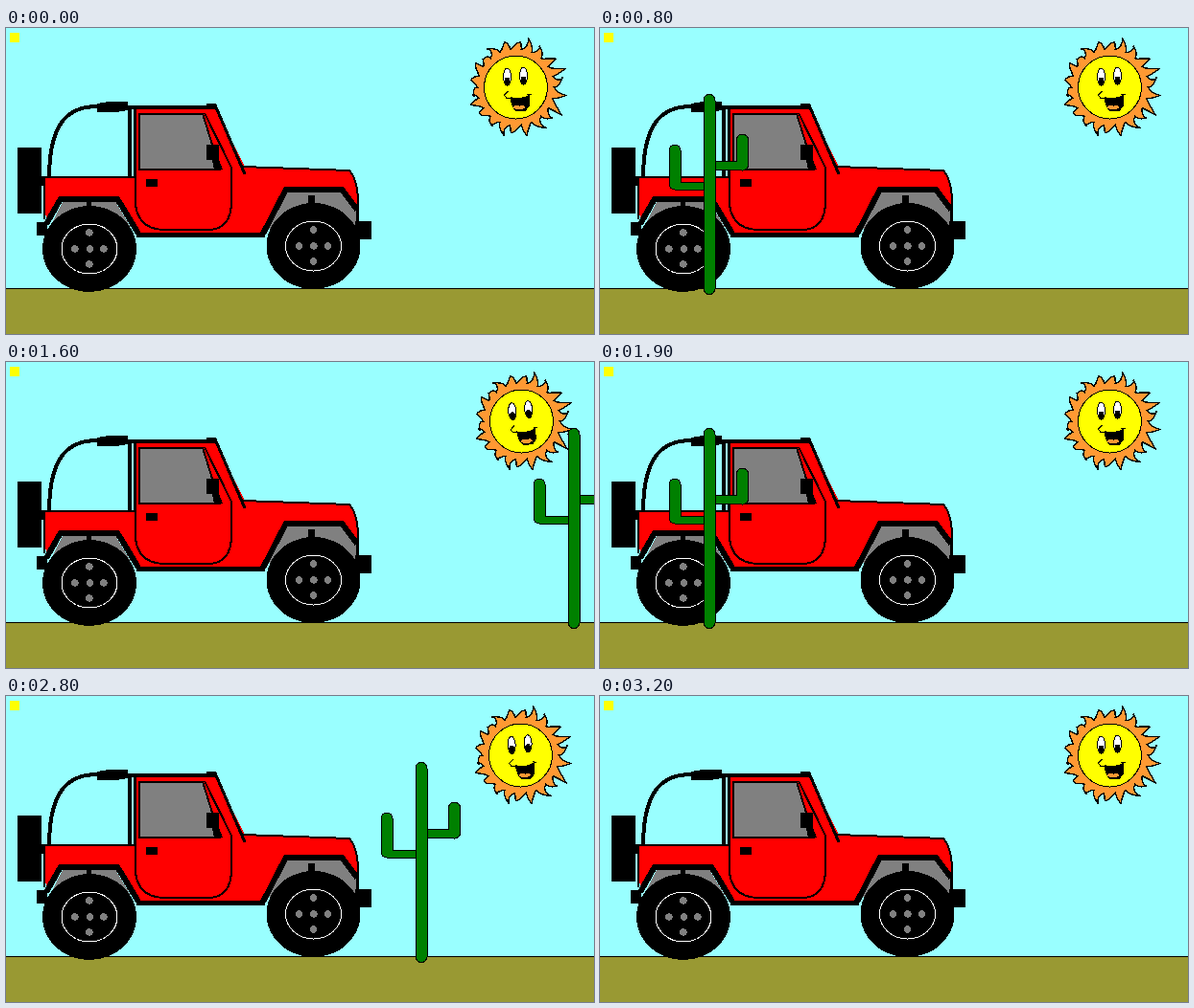
These frames come from a looping animation (613x320 px, 3300 ms). An HTML page:

```html
<!DOCTYPE html>
<html lang="en">
<head>
<meta charset="utf-8">
<title>Desert drive</title>
<style>
  html, body { margin: 0; width: 100%; height: 100%; overflow: hidden; background: #9ff; }
  svg { display: block; width: 613px; height: 320px; shape-rendering: crispEdges; }
  .line { fill: none; stroke: #000; }
  .grey { fill: #808080; }
</style>
</head>
<body>
<svg viewBox="0 0 613 320">
  <defs>
    <g id="wheel">
      <ellipse rx="49" ry="45"/>
      <ellipse rx="29" ry="26" fill="none" stroke="#fff"/>
      <g class="grey">
        <circle cy="-17" r="3.7"/><circle cx="-15" r="3.7"/><circle cx=".5" r="3.7"/>
        <circle cx="15" r="3.7"/><circle cy="16" r="3.7"/>
      </g>
    </g>
  </defs>

  <rect width="613" height="320" fill="#9ff"/>
  <rect y="272" width="613" height="48" fill="#993"/>
  <rect y="272" width="613" height="1"/>
  <rect x="4" y="5" width="10" height="10" fill="#ff0"/>

  <g id="sun">
    <path id="rays" fill="#f93" stroke="#000" stroke-width="1.4"/>
    <circle r="33" fill="#ff0" stroke="#000"/>
    <g id="face">
      <g fill="#fff" stroke="#000">
        <ellipse cx="-9" cy="-11" rx="4" ry="9"/>
        <ellipse cx="8" cy="-12" rx="4" ry="9"/>
      </g>
      <ellipse cx="-9" cy="-6" rx="3" ry="4.5"/>
      <ellipse cx="8" cy="-7" rx="3" ry="4.5"/>
      <path class="line" d="M-8 4L-12 8L-10 11H-6Q5 14 14 8M12 7L16 8"/>
      <path d="M-6 10Q5 13 14 8V20L10 25H0Q-5 21 -6 10Z"/>
      <path d="M-3 21Q0 17 4 20Q8 17 10 21Q4 26 -3 21Z" fill="#f93"/>
    </g>
  </g>

  <g id="car">
    <path class="line" stroke-width="4" d="M45 157C45 131 49 105 64 92C75 83 86 82 98 82"/>
    <path d="M95 79L107 77H127V86L115 88H95Z"/>
    <path fill="#f00" d="M39 156H134V83H218L249 145L358 149Q368 160 367 190L350 169H292L268 215H138L115 179H57L42 204Z"/>
    <path class="line" stroke-width="4" d="M126 83H218M128.500 83V157"/>
    <path class="line" stroke-width="3" d="M209 80.500H218L249 153"/>
    <path class="line" stroke-width="2" d="M40 200V156H134V83M247 145L358 149Q368 160 367 190"/>
    <path class="line" stroke-width="2" d="M134.500 84V178Q135 210 164 211H212Q235 210 235 181V146L207 89"/>
    <path class="grey" stroke="#000" stroke-width="2" d="M139 89.500H205L223 148H139Z"/>
    <path d="M209 122H222V138L226 148H217L215 138H209Z"/>
    <rect x="146" y="158" width="12" height="8"/>
    <path d="M12 125H37V155H41V165H37V194H12Z"/>

    <path class="grey" d="M46 208L60 180H113L130 208ZM272 210L294 171H350L365 190V208Z"/>
    <path class="line" stroke-width="6" d="M42 205L57 178.500H116L138 215M268 215L292 168.500H350L366 190"/>
    <path class="line" stroke-width="5" d="M136 216.500H270"/>
    <path class="line" stroke-width="3" d="M366 188V206"/>
    <rect x="84" y="181" width="5" height="9"/>
    <rect x="315" y="175" width="7" height="11"/>
    <rect x="32" y="203" width="11" height="14"/>
    <rect x="364" y="202" width="17" height="19"/>
    <use href="#wheel" x="87" y="231"/>
    <use href="#wheel" x="320.500" y="228"/>
  </g>

  <g id="puff" class="grey">
    <ellipse cx="5" cy="227" rx="4" ry="4"/>
    <ellipse cx="12" cy="230.500" rx="8" ry="4.500"/>
    <ellipse cx="19" cy="224.500" rx="4" ry="5"/>
  </g>
  <g id="cactus" fill="none" stroke-linecap="round"></g>
</svg>
<script>
const el = id => document.getElementById(id);
const STEP = 100, STEPS = 11;

// Narrow flames of uneven length, bent sideways, with short valleys between.
function rayPath(count) {
  const at = (r, a) => (r * Math.cos(a)).toFixed(1) + " " + (r * Math.sin(a)).toFixed(1);
  const gap = 2 * Math.PI / count;
  let d = "M" + at(40, 0);
  for (let i = 0; i < count; i++) {
    const a = i * gap;
    const tip = 50 + 3 * Math.sin(i * 2.3) + 3 * Math.cos(a);
    const lean = gap * (.55 + .35 * Math.sin(i * 1.7));
    d += `Q${at(41, a + gap * .15)} ${at(42, a + gap * .25)}`;
    d += `Q${at(47, a + gap * .55)} ${at(tip, a + lean)}`;
    d += `Q${at(46, a + gap * .95)} ${at(40, a + gap)}`;
  }
  return d + "Z";
}

// Each limb is a list of [path, thickness]; outlines merge within a limb.
function limb(parts) {
  const strokes = (color, inset) => parts.map(([d, w]) =>
    `<path d="${d}" stroke="${color}" stroke-width="${w - inset}"/>`).join("");
  return strokes("#000", 0) + strokes("#008000", 2);
}

el("rays").setAttribute("d", rayPath(22));
el("cactus").innerHTML =
  limb([["M-36 128V163", 13], ["M-36 165H0", 9]]) +
  limb([["M34.500 117V143", 13], ["M34 144H0", 10]]) +
  limb([["M0 75.500V272.500", 13]]);

const sunPoses = {
  left: { x: 531.5, turn: 0 },
  middle: { x: 536.5, turn: -2 },
  right: { x: 537.5, turn: -4 }
};
const sunCycle = ["left", "middle", "right"];
const cactusStops = [592, 433, 273, 114, -30];
const puffStops = { 1: 9, 2: 0 };

function place(node, x) {
  node.style.display = x === undefined ? "none" : "";
  if (x !== undefined) node.setAttribute("transform", `translate(${x} 0)`);
}

function draw(time) {
  const step = Math.floor(time / STEP) % STEPS;
  const poseName = step > 6 ? "left" : step === 6 ? "middle" : sunCycle[step % 3];
  const pose = sunPoses[poseName];
  el("sun").setAttribute("transform", `translate(${pose.x} 62)`);
  el("face").setAttribute("transform", `rotate(${pose.turn})`);
  place(el("cactus"), cactusStops[step - 5]);
  place(el("puff"), puffStops[step]);
}

const start = performance.now();
function tick() {
  draw(performance.now() - start);
  requestAnimationFrame(tick);
}
tick();
</script>
</body>
</html>
```
